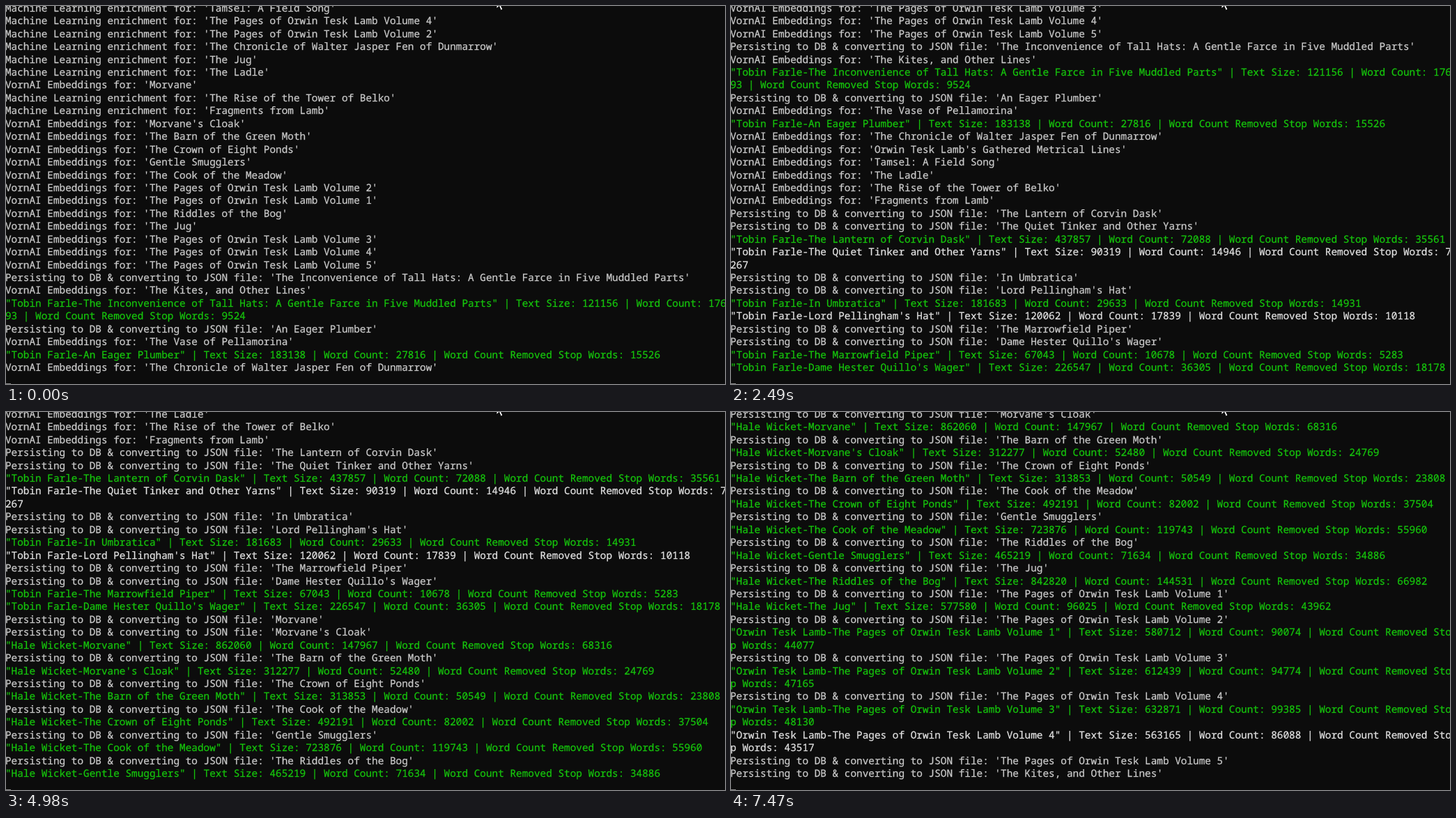
Write an HTML page that moves like this. It is 1032 by 543 pixels and loops after 8000 ms.

```html
<!DOCTYPE html>
<html lang="en">
<head>
<meta charset="utf-8">
<title>Console log</title>
<style>
  html, body {
    margin: 0;
    width: 100%;
    height: 100%;
    overflow: hidden;
    background: #0c0c0c;
  }
  body { position: relative; }
  #log {
    --row: 18.4375px;
    --start: -5.2px;
    position: absolute;
    left: -1.1px;
    top: var(--start);
    margin: 0;
    color: #ccc;
    font: 14.39px/var(--row) "Noto Sans Mono", "DejaVu Sans Mono", monospace;
    font-variant-ligatures: none;
    text-rendering: geometricPrecision;
    -webkit-text-stroke: 0.25px;
    white-space: pre;
    animation: scroll 8s step-end infinite;
  }
  #log div { height: var(--row); }
  #log .done { color: #16c60c; }
  #log .plain { color: #e4e4e4; }
  #prompt {
    position: absolute;
    left: 0;
    top: 529px;
    width: 100%;
    height: 14px;
    background: #0c0c0c;
  }
  #prompt::after {
    content: "";
    position: absolute;
    left: 0;
    top: 13px;
    width: 7px;
    height: 1px;
    background: #888;
  }
  #pointer {
    position: absolute;
    left: 703px;
    top: -13px;
  }
  /* Each stop names the log line at the top of the window. */
  @keyframes scroll {
    0% { top: var(--start); }
    10.375% { top: calc(var(--start) - 8 * var(--row)); }
    20.75% { top: calc(var(--start) - 17 * var(--row)); }
    31.125% { top: calc(var(--start) - 18 * var(--row)); }
    41.5% { top: calc(var(--start) - 19 * var(--row)); }
    51.875% { top: calc(var(--start) - 27 * var(--row)); }
    62.25% { top: calc(var(--start) - 31 * var(--row)); }
    72.625% { top: calc(var(--start) - 35 * var(--row)); }
    83% { top: calc(var(--start) - 41 * var(--row)); }
    93.375%, 100% { top: calc(var(--start) - 48 * var(--row)); }
  }
</style>
</head>
<body>
<div id="log"></div>
<div id="prompt"></div>
<svg id="pointer" width="16" height="22" viewBox="-1 -0.5 16 22">
  <path d="M0 0V16.3L3.8 12.8L6.4 18.7L9 17.6L6.4 11.9H11.6Z" fill="#fff" stroke="#000" stroke-width="1"/>
</svg>
<script>
const COLUMNS = 120;
const log = document.getElementById('log');

const farle = 'Tobin Farle', wicket = 'Hale Wicket', lamb = 'Orwin Tesk Lamb';
const pages = n => `The Pages of ${lamb} Volume ${n}`;

const hats = 'The Inconvenience of Tall Hats: A Gentle Farce in Five Muddled Parts';
const plumber = 'An Eager Plumber';
const lantern = 'The Lantern of Corvin Dask';
const tinker = 'The Quiet Tinker and Other Yarns';
const umbra = 'In Umbratica';
const hat = "Lord Pellingham's Hat";
const piper = 'The Marrowfield Piper';
const wager = "Dame Hester Quillo's Wager";

const morvane = 'Morvane';
const cloak = "Morvane's Cloak";
const moth = 'The Barn of the Green Moth';
const crown = 'The Crown of Eight Ponds';
const smugglers = 'Gentle Smugglers';
const cook = 'The Cook of the Meadow';
const bog = 'The Riddles of the Bog';
const jug = 'The Jug';

const song = 'Tamsel: A Field Song';
const walter = 'The Chronicle of Walter Jasper Fen of Dunmarrow';
const ladle = 'The Ladle';
const tower = 'The Rise of the Tower of Belko';
const fragments = 'Fragments from Lamb';
const kites = 'The Kites, and Other Lines';
const vase = 'The Vase of Pellamorina';
const verse = `${lamb}'s Gathered Metrical Lines`;

// Long lines wrap hard at the console width.
function print(text, style = '') {
  for (let i = 0; i < text.length; i += COLUMNS) {
    const row = document.createElement('div');
    row.className = style;
    row.textContent = text.slice(i, i + COLUMNS);
    log.append(row);
  }
}

const enrich = (...titles) => titles.forEach(t => print(`Machine Learning enrichment for: '${t}'`));
const embed = (...titles) => titles.forEach(t => print(`VornAI Embeddings for: '${t}'`));
const persist = (...titles) => titles.forEach(t => print(`Persisting to DB & converting to JSON file: '${t}'`));
const stats = (author, title, size, words, kept, style = 'done') =>
  print(`"${author}-${title}" | Text Size: ${size} | Word Count: ${words} | Word Count Removed Stop Words: ${kept}`, style);

enrich(song, pages(4), pages(2), walter, jug, ladle);
embed(morvane);
enrich(tower, fragments);
embed(cloak, moth, crown, smugglers, cook, pages(2), pages(1), bog, jug, pages(3), pages(4), pages(5));
persist(hats);
embed(kites);
stats(farle, hats, 121156, 17693, 9524);
persist(plumber);
embed(vase);
stats(farle, plumber, 183138, 27816, 15526);
embed(walter, verse, song, ladle, tower, fragments);
persist(lantern, tinker);
stats(farle, lantern, 437857, 72088, 35561);
stats(farle, tinker, 90319, 14946, 7267, 'plain');
persist(umbra, hat);
stats(farle, umbra, 181683, 29633, 14931);
stats(farle, hat, 120062, 17839, 10118, 'plain');
persist(piper, wager);
stats(farle, piper, 67043, 10678, 5283);
stats(farle, wager, 226547, 36305, 18178);
persist(morvane, cloak);
stats(wicket, morvane, 862060, 147967, 68316);
persist(moth);
stats(wicket, cloak, 312277, 52480, 24769);
persist(crown);
stats(wicket, moth, 313853, 50549, 23808);
persist(cook);
stats(wicket, crown, 492191, 82002, 37504);
persist(smugglers);
stats(wicket, cook, 723876, 119743, 55960);
persist(bog);
stats(wicket, smugglers, 465219, 71634, 34886);
persist(jug);
stats(wicket, bog, 842820, 144531, 66982);
persist(pages(1));
stats(wicket, jug, 577580, 96025, 43962);
persist(pages(2));
stats(lamb, pages(1), 580712, 90074, 44077);
persist(pages(3));
stats(lamb, pages(2), 612439, 94774, 47165);
persist(pages(4));
stats(lamb, pages(3), 632871, 99385, 48130);
stats(lamb, pages(4), 563165, 86088, 43517, 'plain');
persist(pages(5), kites);
</script>
</body>
</html>
```
